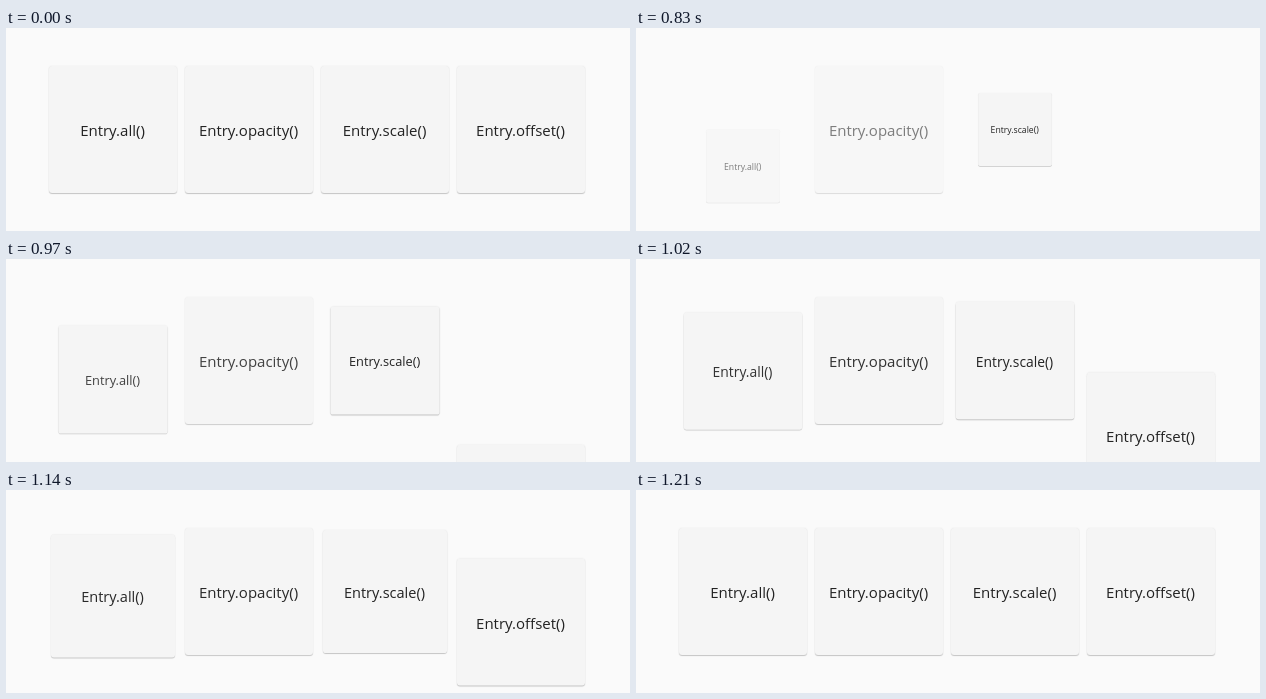
An HTML page that plays this animation: 624 px wide and 203 px high, repeating every 1440 ms.

```html
<!DOCTYPE html>
<html lang="en">
<head>
<meta charset="utf-8">
<title>Entry transitions</title>
<style>
  html, body {
    margin: 0;
    width: 100%;
    height: 100%;
    overflow: hidden;
    background: #fafafa;
  }
  #stage {
    position: relative;
    width: 624px;
    height: 203px;
    overflow: hidden;
  }
  .card {
    position: absolute;
    top: 38px;
    width: 128px;
    height: 127px;
    border-radius: 3px;
    background: #f5f5f5;
    box-shadow: 0 1px 1px rgba(0, 0, 0, .2), 0 0 2px rgba(0, 0, 0, .07);
    color: #222;
    font: 15px/128px "Open Sans", "Noto Sans", sans-serif;
    text-align: center;
    text-indent: -1px;
    white-space: nowrap;
  }
</style>
</head>
<body>
<div id="stage"></div>
<script>
const LOOP = 1440;

// moments (ms) at which the picture moves on; it holds in between
const STARTS = [780, 800, 830, 930, 970, 1000, 1020, 1040, 1140, 1180, 1210];
// animation clock at every second moment, in ticks; the others lie midway
const TICKS = [0, 6, 10, 12, 14, 18];

const KINDS = [
  { name: "all", fade: true, zoom: true, rise: 150 },
  { name: "opacity", fade: true },
  { name: "scale", zoom: true },
  { name: "offset", rise: 1000 }
];

const stage = document.getElementById("stage");
const cards = KINDS.map((kind, i) => {
  const el = document.createElement("div");
  el.className = "card";
  el.style.left = 43 + 136 * i + "px";
  el.textContent = `Entry.${kind.name}()`;
  stage.append(el);
  return { el, ...kind };
});

const bezier = (a, b, s) =>
  3 * a * s * (1 - s) ** 2 + 3 * b * s * s * (1 - s) + s ** 3;

// cubic-bezier(.25, .1, .25, 1), solved by bisection
function ease(x) {
  if (x <= 0 || x >= 1) return x;
  let lo = 0, hi = 1;
  for (let i = 0; i < 24; i++) {
    const mid = (lo + hi) / 2;
    if (bezier(.25, .25, mid) < x) lo = mid;
    else hi = mid;
  }
  return bezier(.1, 1, lo);
}

function progressAt(t) {
  if (t < STARTS[0]) return 1;
  const half = (STARTS.filter(start => start <= t).length - 1) / 2;
  const tick = (TICKS[Math.floor(half)] + TICKS[Math.ceil(half)]) / 2;
  return ease(tick / 18);
}

function pose({ el, fade, zoom, rise = 0 }, p) {
  const scale = zoom ? p : 1;
  const dy = rise * (1 - p);
  el.style.opacity = fade ? p : 1;
  el.style.visibility = p > 0 ? "visible" : "hidden";
  // the offset is applied inside the scaled space
  el.style.transform = p < 1 ? `scale(${scale}) translateY(${dy}px)` : "none";
}

function draw() {
  const p = progressAt(performance.now() % LOOP);
  cards.forEach(card => pose(card, p));
  requestAnimationFrame(draw);
}
draw();
</script>
</body>
</html>
```
